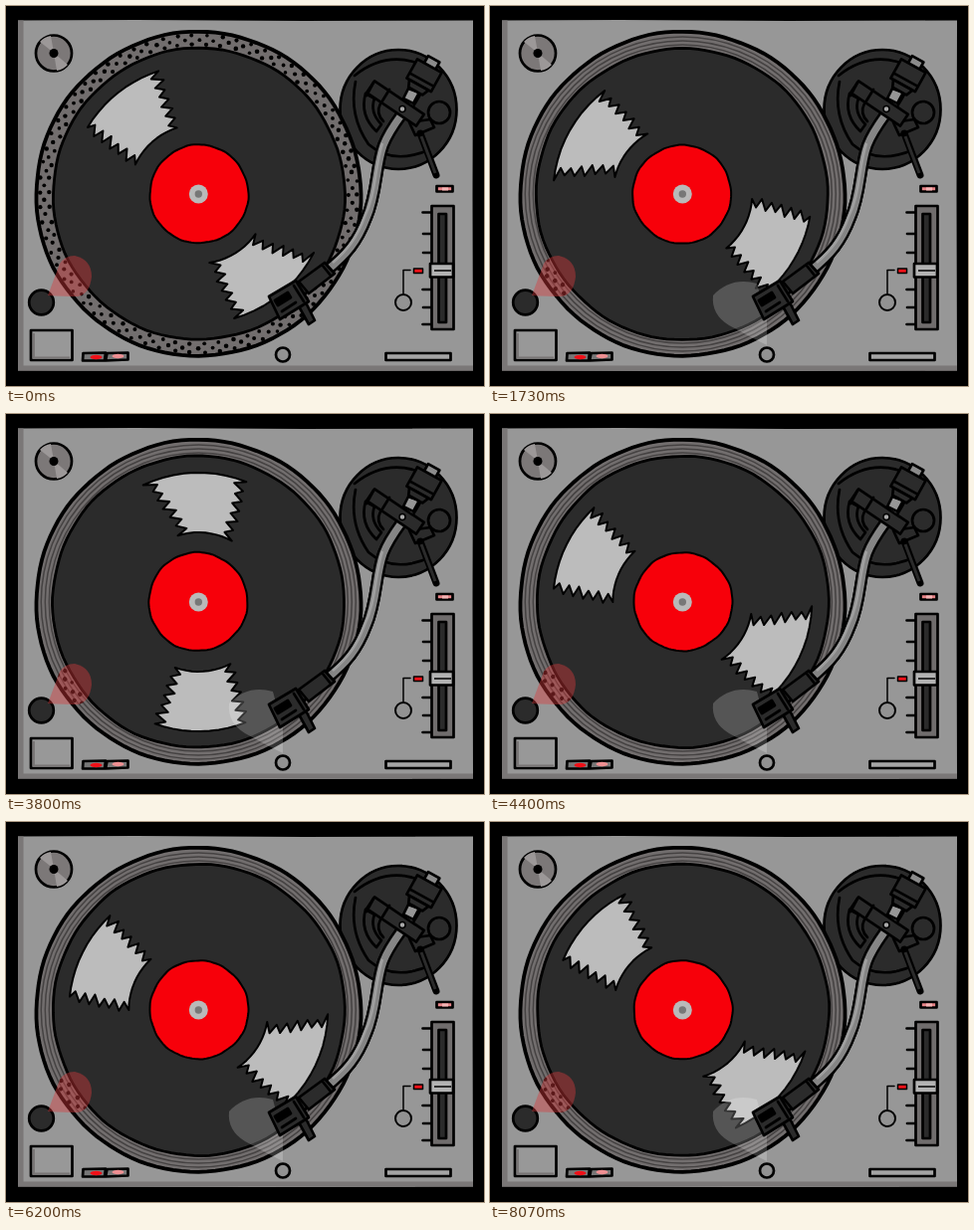
These frames come from a looping animation (480 px wide and 382 px high, 8.14 s). An HTML page:

```html
<!DOCTYPE html>
<html lang="en">
<head>
<meta charset="utf-8">
<title>Turntable</title>
<style>
  html, body { margin: 0; width: 100%; height: 100%; overflow: hidden; background: #000; }
  svg { display: block; width: 480px; height: 382px; }
  .ink { stroke: #000; stroke-width: 2.7; stroke-linejoin: round; stroke-linecap: round; }
  .dark { fill: #2b2b2b; }
  .line { fill: none; }
  .lines circle { fill: none; stroke: #454242; stroke-width: 1.5; }
</style>
</head>
<body>
<svg viewBox="0 0 480 382">
  <defs>
    <path id="strobe" d="M42 291 L54 259 Q59 251 69 251 Q86 255 86 272 Q84 290 72 292 Q60 292 42 291Z"/>
    <clipPath id="strobeClip"><use href="#strobe"/></clipPath>
  </defs>

  <path d="M12 14.500 L130 14 L300 15 L469 14.500 L468.500 190 L469 366.500 L250 367 L12 366.500 L12.500 200Z" fill="#979797"/>
  <path d="M12 14.500 H17.500 V361.500 H469 V366.500 H12Z" fill="#7a7777"/>

  <!-- adapter -->
  <circle class="ink" cx="48" cy="47.500" r="18" fill="#7c7878"/>
  <path d="M48 47 L34 36 A18 18 0 0 1 45 30Z M48 47 L62 59 A18 18 0 0 1 51 65Z" fill="#9c9898"/>
  <circle cx="48" cy="47.500" r="4.500"/>

  <!-- buttons -->
  <circle class="ink dark" cx="35.500" cy="298" r="12.300"/>
  <rect class="ink" x="25" y="326" width="41.500" height="30" fill="#989898"/>
  <path d="M28 329 V353.500 H64" class="line" stroke="#7a7777" stroke-width="2"/>
  <path class="ink" d="M77.500 349 L100 348.500 L99 356.500 H77Z M101.500 349 L122.500 348.500 V355.500 L100 356.500Z" fill="#777"/>
  <ellipse cx="90.500" cy="353" rx="6" ry="2.200" fill="#f01018"/>
  <ellipse cx="112.500" cy="352" rx="6" ry="2.200" fill="#ee8f92"/>
  <circle class="ink" cx="278" cy="350.500" r="7" fill="#929292"/>
  <rect class="ink" x="381.500" y="349" width="65" height="7" fill="#a5a5a5"/>

  <!-- pitch control -->
  <rect class="ink" x="432.500" y="181" width="16" height="5.500" fill="#e88488"/>
  <path d="M438 184 H444" stroke="#f3b5b5" stroke-width="3"/>
  <path class="ink" d="M418.500 207.500 H427 M419 229 H427 M419 248 H427 M418.500 285 H427 M419 303 H427 M418.500 320 H427"/>
  <rect class="ink" x="427.500" y="201" width="22" height="124" fill="#706d6d"/>
  <rect class="ink dark" x="434.500" y="209" width="7.500" height="109"/>
  <rect class="ink" x="426" y="259" width="23" height="13.500" fill="#b3b3b3"/>
  <path d="M430 266 H447" stroke="#000" stroke-width="1.500"/>
  <rect class="ink" x="409.500" y="264" width="9" height="4.500" fill="#f01018" style="stroke-width:1.500"/>
  <path class="line ink" d="M406 265.500 H399 V289" style="stroke-width:1.500"/>
  <circle class="ink" cx="399" cy="298" r="8" fill="#929292" style="stroke-width:2"/>

  <!-- tonearm base -->
  <ellipse class="ink dark" cx="394" cy="104" rx="58.500" ry="60"/>
  <g class="line ink">
    <path d="M350 70 Q385 42 424 62 M351 76 Q344 110 364 139 Q388 160 424 145"/>
    <path d="M361 88 Q355 110 372 126 L377 119 Q365 107 370 93Z"/>
    <path d="M376 98 Q371 108 379 116"/>
  </g>
  <circle class="ink dark" cx="435" cy="107" r="11"/>
  <path class="ink dark" d="M405 117 L426 114 L430 122 L411 130Z"/>
  <path d="M416 128 L432 170" class="ink" style="stroke-width:7"/>
  <path d="M417 131 L431 168" stroke="#2b2b2b" stroke-width="3"/>

  <!-- platter -->
  <path id="platter" fill="#726e6e" stroke="#000" stroke-width="3.800"/>
  <g id="lines" class="lines">
    <circle cx="193.300" cy="189" r="150"/>
    <circle cx="193.300" cy="189" r="154"/>
    <circle cx="193.300" cy="189" r="158"/>
  </g>
  <g id="dotClip"><g id="dots"></g></g>

  <g id="record">
    <path id="disc" class="dark" stroke="#000" stroke-width="2.800"/>
    <path id="shine" fill="#bcbcbc" stroke="#000" stroke-width="2" stroke-linejoin="round"/>
    <path id="label" fill="#f7000a" stroke="#000" stroke-width="2"/>
  </g>
  <circle cx="193.300" cy="189" r="9.500" fill="#b9b9b9"/>
  <circle cx="193.300" cy="189" r="3.700" fill="#777"/>

  <use href="#strobe" fill="#d83a3c" fill-opacity=".42"/>
  <path id="lamp" d="M268 279 Q242 272 224 291 Q222 310 240 321 Q262 333 278 341 L278 316Z" fill="#fff" fill-opacity=".2"/>

  <!-- arm -->
  <g class="line" id="arm">
    <path id="tube" d="M412 86 C402 106 387 119 379 140 C371 162 373 188 362 213 C353 237 342 250 322 266" stroke="#000" stroke-width="12"/>
    <use href="#tube" style="stroke:#858585"/>
    <path d="M412 86 C402 106 387 119 379 140 C371 162 373 188 362 213 C353 237 342 250 322 266" stroke="#858585" stroke-width="7.400"/>
    <path d="M378 138 C370 162 372 188 360 212 C352 234 342 246 328 258" stroke="#a0a0a0" stroke-width="2.500"/>
  </g>
  <rect class="ink dark" x="-30" y="-7" width="60" height="14" transform="translate(391 98) rotate(34)"/>
  <path class="ink" d="M369 77 L362 90 M385 84 L377 97"/>
  <path class="ink" d="M404 83 L415 87 L409 98 L399 93Z" fill="#969696"/>
  <circle class="ink" cx="398" cy="103.500" r="3" fill="#aaa" style="stroke-width:1.500"/>
  <g class="ink" transform="translate(419 71.500) rotate(29)">
    <rect x="-6" y="-21" width="13" height="10" fill="#8b8b8b"/>
    <rect class="dark" x="-14" y="-13" width="28" height="22"/>
    <path class="dark" d="M-11 9 H11 L8 16 H-8Z"/>
    <path d="M-13 3 H13"/>
  </g>

  <!-- headshell -->
  <g class="ink">
    <path class="dark" d="M294 302 L301 298 L310 316 L304 320Z"/>
    <path class="dark" d="M320 258 L330 269 L304 289 L294 277Z"/>
    <path class="dark" d="M264 292 L291 276 L304 297 L275 315Z"/>
    <path d="M318 261 L326 271 M270 296 L283 288 L286 293 L273 301Z M277 307 L291 298 M289 281 L299 297"/>
  </g>
</svg>
<script>
const CX = 193.3, CY = 189, SVG = 'http://www.w3.org/2000/svg';
const $ = id => document.getElementById(id);
const polar = (r, deg, x = CX, y = CY) => {
  const a = deg * Math.PI / 180;
  return [x + r * Math.cos(a), y + r * Math.sin(a)];
};
const toPath = pts => 'M' + pts.map(p => p.map(v => v.toFixed(1)).join(' ')).join('L') + 'Z';

let seed = 7;
const rand = () => (seed = seed * 16807 % 2147483647) / 2147483647;

// hand-drawn circle
function blob(r, x, y, wobble) {
  const pts = [];
  for (let a = 0; a < 360; a += 3) {
    const k = a * Math.PI / 180;
    pts.push(polar(r + wobble * (Math.sin(3 * k) + Math.sin(7 * k + 1) + .6 * Math.sin(17 * k)), a, x, y));
  }
  return toPath(pts);
}

// reflection between two angles with torn sides
function torn(outA, outB, inA, inB, inset) {
  const R = 130, r = 70, teeth = 6, pts = [];
  for (let i = 0; i <= 10; i++) pts.push(polar(R, outA + (outB - outA) * i / 10));
  const side = (from, to, r0, r1, dir) => {
    for (let i = 1; i < teeth * 2; i++) {
      const u = i / (teeth * 2), rad = r0 + (r1 - r0) * u;
      const bite = (i % 2 ? -8 : 1) - inset + (rand() - .5) * 3;
      pts.push(polar(rad, from + (to - from) * u + dir * bite / rad * 57.3));
    }
  };
  side(outB, inB, R, r, 1);
  for (let i = 0; i <= 10; i++) pts.push(polar(r, inB + (inA - inB) * i / 10));
  side(inA, outA, r, R, -1);
  return toPath(pts);
}

$('platter').setAttribute('d', blob(163, CX, CY, .25));
$('disc').setAttribute('d', blob(146.5, CX + .4, CY, .3));
$('label').setAttribute('d', blob(49.5, CX + .6, CY, .25));
$('shine').setAttribute('d', torn(211, 252, 205, 252, 0) + torn(27, 74, 35, 81, 3));

const PER_ROW = 66;
[150.5, 155, 159.5].forEach((r, row) => {
  for (let i = 0; i < PER_ROW; i++) {
    const [x, y] = polar(r + rand() - .5, (i + row % 2 * .5 + rand() * .15) * 360 / PER_ROW);
    const dot = document.createElementNS(SVG, 'circle');
    dot.setAttribute('cx', x.toFixed(1));
    dot.setAttribute('cy', y.toFixed(1));
    dot.setAttribute('r', (1.8 + rand() * .5).toFixed(1));
    $('dots').append(dot);
  }
});

const LOOP = 8140, LAMP_ON = 400, SPIN = 930, FPS = 15, POSES = 43;
const start = performance.now();

function draw() {
  const t = (performance.now() - start) % LOOP;
  const spinning = t >= SPIN;
  const step = Math.max(0, Math.floor((t + 4) * FPS / 1000) - 14);
  const pose = Math.floor(step * 1.6 + .5) % POSES;
  const turn = `rotate(${pose * 360 / POSES} ${CX} ${CY})`;
  $('record').setAttribute('transform', turn);
  $('dots').setAttribute('transform', turn);
  $('dotClip').setAttribute('clip-path', spinning ? 'url(#strobeClip)' : 'none');
  $('lines').style.display = spinning ? '' : 'none';
  $('lamp').style.display = t >= LAMP_ON ? '' : 'none';
  requestAnimationFrame(draw);
}
draw();
</script>
</body>
</html>
```
